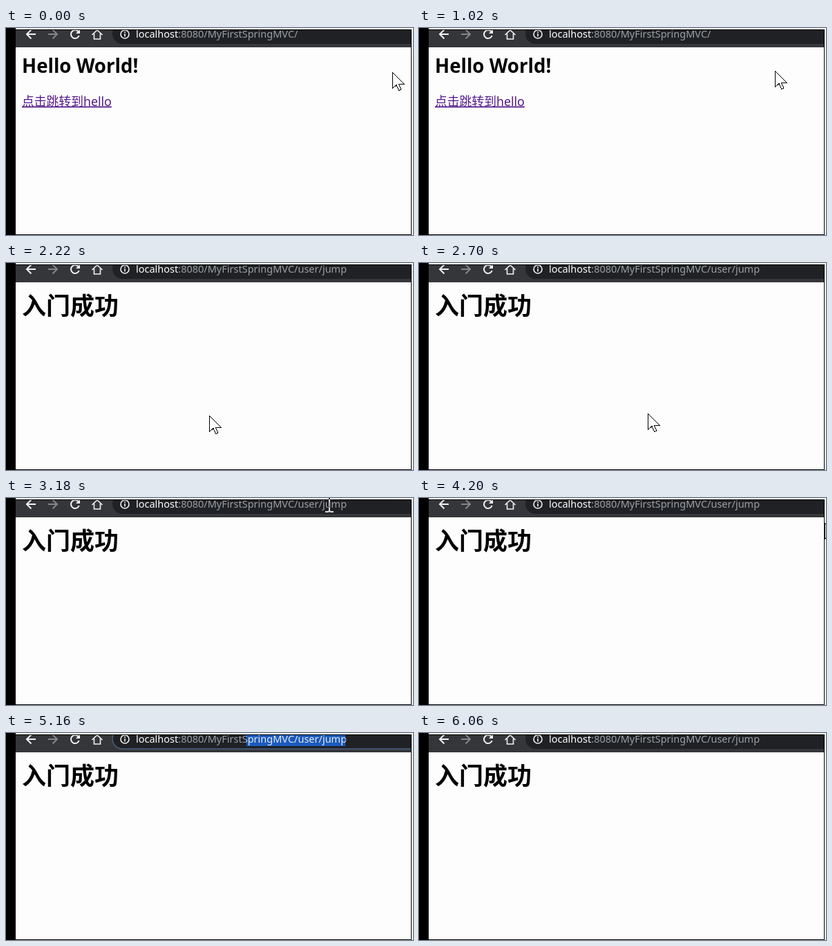
Animation of 589 by 300 pixels, one loop 6.18 s. Source, as an HTML page:

```html
<!DOCTYPE html>
<html lang="zh">
<head>
<meta charset="utf-8">
<style>
  html, body { margin: 0; width: 100%; height: 100%; overflow: hidden; background: #fff; }
  svg { display: block; }
  text { font-family: "Noto Sans", "Open Sans", "Noto Sans CJK SC", "Noto Sans CJK", sans-serif; }
  .url { font-size: 14.5px; }
  .icon { fill: none; stroke: #f1f3f4; stroke-width: 2; }
  .icon .dim { stroke: #84868a; }
  .icon .thin { stroke-width: 1.6; }
  .icon .solid { fill: #f1f3f4; stroke: none; }
  .cursor { fill: #fff; stroke: #000; shape-rendering: crispEdges; }
  #ibeam { fill: none; stroke: #fff; stroke-width: 2; mix-blend-mode: difference; }
  #link { font-size: 17.8px; font-weight: 300; text-decoration: underline 1px; }
</style>
</head>
<body>
<svg width="589" height="300" viewBox="0 0 589 300">
  <defs>
    <clipPath id="window"><rect x="14" y="3" width="572" height="296"/></clipPath>
    <clipPath id="selClip"><rect class="sel" y="3" height="16"/></clipPath>
  </defs>
  <rect width="589" height="300" fill="#fff"/>
  <rect width="14" height="300"/>
  <rect x="14" y="2" width="573" height="298"/>

  <g clip-path="url(#window)">
    <rect x="14" y="3" width="572" height="296" fill="#fdfdfd"/>
    <rect x="14" y="3" width="572" height="25" fill="#35363a"/>
    <rect id="pill" x="154" y="-6" width="500" height="29" rx="14.5" fill="#202124" stroke-width="1.5"/>

    <g class="icon">
      <path d="M43 9H30M36.5 2.5L30 9l6.5 6.5"/>
      <path class="dim" d="M61 9H74M67.5 2.5L74 9l-6.5 6.5"/>
      <path d="M104.5 5A6 6 0 1 0 105.7 11"/>
      <path class="solid" d="M107 2V8H101Z"/>
      <path class="thin" d="M124.5 10L132 3L139.5 10M127.5 8V16H136.5V8"/>
      <circle class="thin" cx="172" cy="9" r="6"/>
      <path class="thin" d="M172 8V12.5M172 5.3V7"/>
    </g>

    <text class="url" x="188" y="14" fill="#9aa0a6"><tspan fill="#fff">localhost</tspan>:8080/MyFirstSpringMVC/<tspan class="after">user/jump</tspan></text>
    <g id="selection">
      <rect class="sel" y="3" height="16" fill="#1a5bbd"/>
      <text class="url" x="188" y="14" fill="#e8eaed" clip-path="url(#selClip)">localhost:8080/MyFirstSpringMVC/user/jump</text>
    </g>

    <g class="before">
      <text x="23" y="65" font-size="27.65" font-weight="700">Hello World!</text>
      <text id="link" x="23" y="112.5">点击跳转到hello</text>
    </g>
    <text class="after" x="23" y="75" font-size="35" font-weight="700">入门成功</text>
  </g>

  <path id="arrow" class="cursor" d="M.5 .5V23.5L6 18.5L9.5 26.5L13 25L9.5 17.5H17.5Z"/>
  <path id="hand" class="cursor" d="M8.5 17V3Q8.5 .5 10.5 .5T12.5 3V11Q16 9.5 16.5 12Q20 10.5 20.5 13.5Q24.5 12 24.5 16V22Q24 26 22 30H10Q8 26 2 19Q0 15.5 3 15Q5 14.5 8.5 19"/>
  <path id="ibeam" d="M-6 -11H-2L0 -10L2 -11H6M0 -10V10M-6 11H-2L0 10L2 11H6"/>
</svg>
<script>
const LOOP = 6180, STEP = 60;
const PRESS = 1440, RELEASE = 1500, PAGE = 1920;
const FOCUS = 4680, DRAG_END = 5160, BLUR = 6060, URL_END = 491;

const linear = p => p;
const easeIn = p => p * p;
const easeOut = p => 1 - (1 - p) ** 3;

// Each glide runs between two times and two points, then rests.
const glides = [
  { span: [0, 180], from: [559, 64], to: [364, 172], ease: easeIn },
  { span: [420, 660], from: [371, 166], to: [600, 66], ease: linear },
  { span: [1020, 1200], from: [515, 62], to: [159, 98], ease: easeOut },
  { span: [1260, 1320], from: [136, 106], to: [110, 107], ease: linear, shape: 'hand' },
  { span: [1980, 2220], from: [112, 108], to: [294, 221], ease: easeOut },
  { span: [2340, 2520], from: [314, 236], to: [317, 243], ease: easeOut },
  { span: [2580, 2940], from: [318, 241], to: [435, 36], ease: easeIn },
  { span: [3000, 3180], from: [440, 16], to: [468, 9], ease: easeOut, shape: 'ibeam' },
  { span: [3240, 3480], from: [480, 18], to: [587, 36], ease: easeOut },
  { span: [4200, 4260], from: [587, 36], to: [509, 33], ease: linear },
  { span: [4440, 4860], from: [503, 20], to: [472, 10], ease: linear, shape: 'ibeam' },
  { span: [5040, 5160], from: [425, 20], to: [348, 38], ease: linear, shape: 'ibeam' }
];

const $ = id => document.getElementById(id);
const each = (q, fn) => document.querySelectorAll(q).forEach(fn);
const show = (el, on) => { el.style.display = on ? '' : 'none'; };

function pointerAt(t) {
  const { span: [start, end], from, to, ease, shape = 'arrow' } = glides.findLast(g => g.span[0] <= t);
  const p = ease(Math.min(1, (t - start) / (end - start)));
  const [x, y] = from.map((a, i) => Math.round(a + (to[i] - a) * p));
  return { x, y, shape };
}

function draw(t) {
  const { x, y, shape } = pointerAt(t);
  const focused = t >= FOCUS && t < BLUR;

  each('.before', el => show(el, t < PAGE));
  each('.after', el => show(el, t >= PAGE));
  $('link').setAttribute('fill', t >= PRESS && t < RELEASE ? '#f00' : '#551a8b');
  $('pill').setAttribute('stroke', focused ? '#4a6285' : 'none');

  // The selection reaches from the end of the address to the pointer.
  show($('selection'), focused);
  each('.sel', el => {
    el.setAttribute('x', x);
    el.setAttribute('width', Math.max(0, URL_END - x));
  });

  each('#arrow, #hand, #ibeam', el => show(el, el.id === shape && t < DRAG_END));
  $(shape).setAttribute('transform', `translate(${x} ${y})`);
}

const began = performance.now();
function tick() {
  const t = (performance.now() - began) % LOOP;
  draw(Math.floor(t / STEP) * STEP);
  requestAnimationFrame(tick);
}
tick();
</script>
</body>
</html>
```
